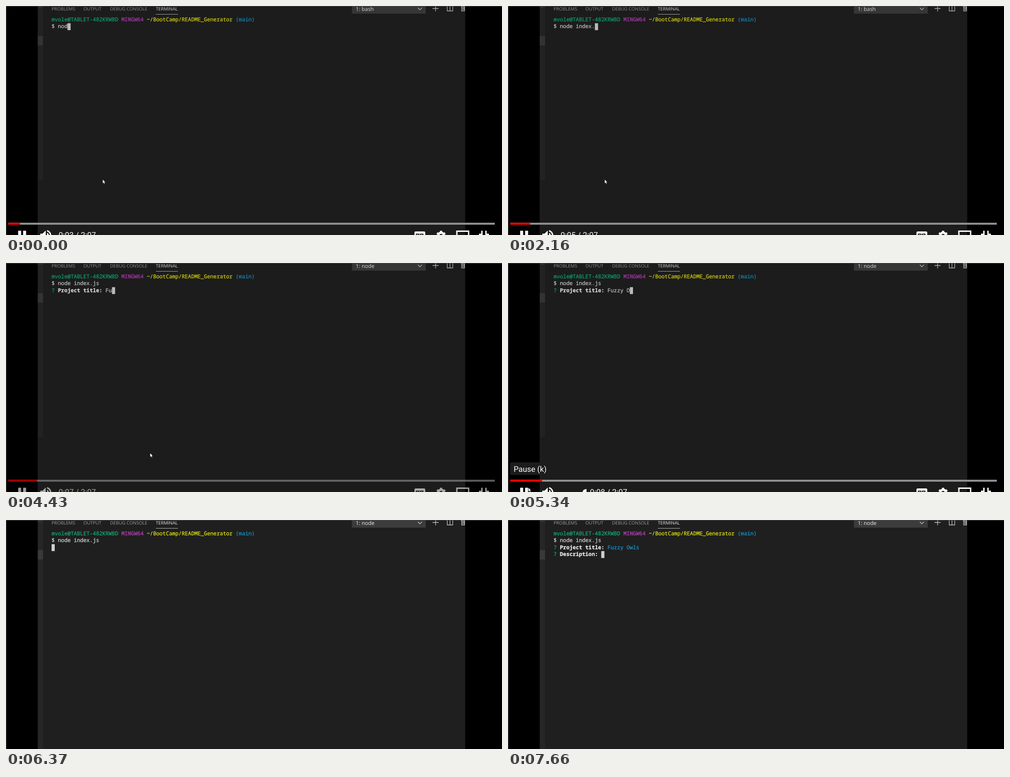
Animation, 1099 px wide and 510 px high, one loop 8000 ms. Source, as an HTML page:

```html
<!DOCTYPE html>
<html lang="en">
<head>
<meta charset="utf-8">
<title>Terminal recording</title>
<style>
  html, body { margin: 0; width: 100%; height: 100%; overflow: hidden; background: #000; }
  svg { display: block; width: 1099px; height: 510px; }
  text { white-space: pre; text-rendering: geometricPrecision; }
  .term { font: 500 11.73px "Noto Sans Mono", monospace; color: #d0d0d0; }
  .term text, .term tspan { fill: currentColor; stroke: currentColor; stroke-width: .3px; }
  .tabs { font: 10.1px "Open Sans", sans-serif; fill: #9c9c9c; }
  .menu { font: 11.9px "Open Sans", sans-serif; fill: #f0f0f0; }
  .player { font: 17.35px Roboto, sans-serif; fill: #fff; }
  .line { fill: none; stroke: #c5c5c5; stroke-width: 1.3; }
  .white { fill: #fff; }
  .outline { fill: none; stroke: #fff; stroke-width: 3; }
  .user { color: #10ae76; }
  .host { color: #b840b8; }
  .path { color: #e2e214; }
  .cyan { color: #1795cc; }
  .ask { color: #ececec; font-weight: 700; }
</style>
</head>
<body>
<svg viewBox="0 0 1099 510">
  <rect width="1099" height="510"/>
  <rect x="70.500" width="947" height="510" fill="#1f1f1f"/>
  <rect x="70.500" width="11.500" height="510" fill="#262627"/>
  <rect x="70.500" width="11.500" height="4" fill="#333"/>
  <rect x="70.500" y="67" width="11.500" height="21" fill="#39393b"/>

  <g class="tabs">
    <text x="101" y="10">PROBLEMS</text>
    <text x="171.500" y="10">OUTPUT</text>
    <text x="230.500" y="10">DEBUG CONSOLE</text>
    <text x="332" y="10" fill="#e7e7e7">TERMINAL</text>
    <path d="M332 18.500h49" stroke="#b8b8b8"/>
  </g>
  <rect x="766.500" width="163.500" height="17" fill="#3c3c3c"/>
  <text id="shell" class="menu" x="775" y="11"></text>
  <g class="line">
    <path d="M912.500 4l4.500 4.500 4.500-4.500M945 5.500h13.500M951.800 0v12"/>
    <path d="M977.600-2h12.200v13h-12.200zM983.700 0v11"/>
    <path d="M1009.600 2v9h6.500v-9M1008 1.500h9M1012 3v6M1014.500 3v6"/>
  </g>

  <g class="term">
    <text x="101" y="34"><tspan class="user">mvole@TABLET-482KRWBD</tspan> <tspan class="host">MINGW64</tspan> <tspan class="path">~/BootCamp/README_Generator</tspan> <tspan class="cyan">(main)</tspan></text>
    <text id="command" x="101" y="49.400"></text>
    <text id="title" x="101" y="64.800"><tspan class="user">? </tspan><tspan class="ask">Project title: </tspan><tspan id="answer"></tspan></text>
    <text id="about" x="101" y="80.200"><tspan class="user">? </tspan><tspan class="ask">Description:</tspan></text>
    <rect id="caret" width="7" height="15.400" fill="#cfcfcf"/>
  </g>

  <g id="shade">
    <rect width="1099" height="510" opacity=".1"/>
    <rect x="70.500" y="388" width="11.500" height="122" fill="#1c1c1c"/>
  </g>
  <g id="controls">
    <rect x="5" y="482.700" width="1078" height="4.300" fill="#929292"/>
    <rect id="played" x="5" y="482.700" height="4.300" fill="#f00"/>
    <g class="white">
      <path d="M27 500.500h6.500v10h-6.500zM38 500.500h6.500v10h-6.500z"/>
      <path d="M76 507h5l7-7v11h-12zM91 505q4 2 4 6h-4z"/>
      <path d="M905 510v-5q0-3 3-3h18q3 0 3 3v5z"/>
    </g>
    <path d="M909 511v-3h6v3M918 511v-3h6v3" fill="none" stroke="#1b1b1b" stroke-width="1.800"/>
    <g class="outline">
      <path d="M91 500.500q7 2.500 8 9.500"/>
      <circle cx="964" cy="511" r="6" stroke-width="5"/>
      <circle cx="964" cy="511" r="9" pathLength="12" stroke-dasharray="1" stroke-dashoffset="-.5"/>
      <path d="M999 511v-9.500h26v9.500"/>
      <path d="M1048 508.500h6.500v-8M1070 508.500h-6.500v-8"/>
    </g>
    <path id="knob" class="white" d="M174 503.500a8 8 0 0 0-9 7h9z"/>
    <text id="clock" class="player" y="515.500"></text>
    <g id="tip">
      <rect x="5" y="444" width="89" height="28" rx="3" fill="#1c1c1c"/>
      <text class="player" x="12.500" y="464.500">Pause (k)</text>
    </g>
  </g>
  <path id="mouse" d="M0 0v9.500l2.200-2 1.500 3.300 1.700-.8-1.500-3.200h2.900z" fill="#fff" stroke="#000" stroke-width=".7"/>
  <path d="M0 .5h1099M.5 0v510" stroke="#4a4a4a"/>
</svg>

<script>
const LOOP = 8000, STEP = 125;
const CHAR = 7.04, LEFT = 101, TOP = 38.4, ROW = 15.4;
const ENTER = 2940, ASK = 3400, SUBMIT = 6370, ANSWERED = 6570, DESCRIBE = 6820;
const HOVER = 4960, TOOLTIP = 5340;
const el = Object.fromEntries([...document.querySelectorAll("[id]")].map(e => [e.id, e]));

// Bursts of typing: when one starts, its text, and the pause between keys
const command = [
  { at: 0, text: "$ nod", gap: 0 },
  { at: 150, text: "e", gap: 0 },
  { at: 510, text: " ind", gap: 123 },
  { at: 1320, text: "ex.", gap: 285 },
  { at: 2400, text: "js", gap: 270 },
];
const title = [
  { at: 4310, text: "Fuzz", gap: 90 },
  { at: 4960, text: "y O", gap: 190 },
  { at: 5670, text: "wls", gap: 125 },
];

// Spells during which the player controls and the mouse are on screen
const spells = [
  { start: 0, end: ENTER, fade: 0, from: [214, 386], to: [214, 386] },
  { start: 4310, end: SUBMIT, fade: 130, from: [330, 420], to: [45, 500] },
  { start: 7260, end: 7660, fade: 120, from: [1060, 442], to: [1060, 442] },
];

const clamp = v => Math.min(1, Math.max(0, v));
const ease = v => v * v * (3 - 2 * v);
const between = (t, a, b) => t >= a && t < b;
const show = (node, on) => node.setAttribute("display", on ? "inline" : "none");

const typedAt = (bursts, t) => bursts.map(({ at, text, gap }) =>
  [...text].filter((_, i) => t >= at + i * gap).join("")).join("");

function drawTerminal(t) {
  const asking = between(t, ASK, SUBMIT), answered = t >= ANSWERED, describing = t >= DESCRIBE;
  const typed = typedAt(title, t), line = typedAt(command, t);

  el.shell.textContent = t < ENTER ? "1: bash" : "1: node";
  el.command.textContent = line;
  el.answer.textContent = typed;
  el.answer.setAttribute("class", answered ? "cyan" : "");
  show(el.title, asking || answered);
  show(el.about, describing);

  let row = 2, col = 0;
  if (t < ENTER) [row, col] = [1, line.length];
  else if (asking) col = "? Project title: ".length + typed.length;
  else if (answered) [row, col] = [3, describing ? "? Description: ".length : 0];
  el.caret.setAttribute("x", LEFT + col * CHAR);
  el.caret.setAttribute("y", TOP + (row - 1) * ROW);
}

function drawPlayer(t) {
  const spell = spells.find(s => between(t, s.start, s.end));
  for (const part of [el.shade, el.controls, el.mouse]) show(part, spell);
  if (!spell) return;

  const { start, end, fade, from, to } = spell;
  const fading = Math.min(t - start, end - t) < fade;
  el.controls.setAttribute("opacity", fading ? .62 : 1);

  const seconds = Math.floor(t / STEP) * STEP / 1000;
  const hover = between(t, HOVER, SUBMIT);
  el.played.setAttribute("width", 26 + 8.5 * seconds);
  el.clock.textContent = `0:${String(Math.floor(3.13 + seconds)).padStart(2, "0")} / 2:07`;
  el.clock.setAttribute("x", hover ? 181.5 : 116.5);
  show(el.knob, hover);
  show(el.tip, between(t, TOOLTIP, SUBMIT));

  const travel = ease(clamp((t - start) / (TOOLTIP - 4310)));
  const spot = from.map((v, i) => v + (to[i] - v) * travel);
  el.mouse.setAttribute("transform", `translate(${spot})`);
}

function frame() {
  const t = performance.now() % LOOP;
  drawTerminal(t);
  drawPlayer(t);
  requestAnimationFrame(frame);
}
frame();
</script>
</body>
</html>
```
